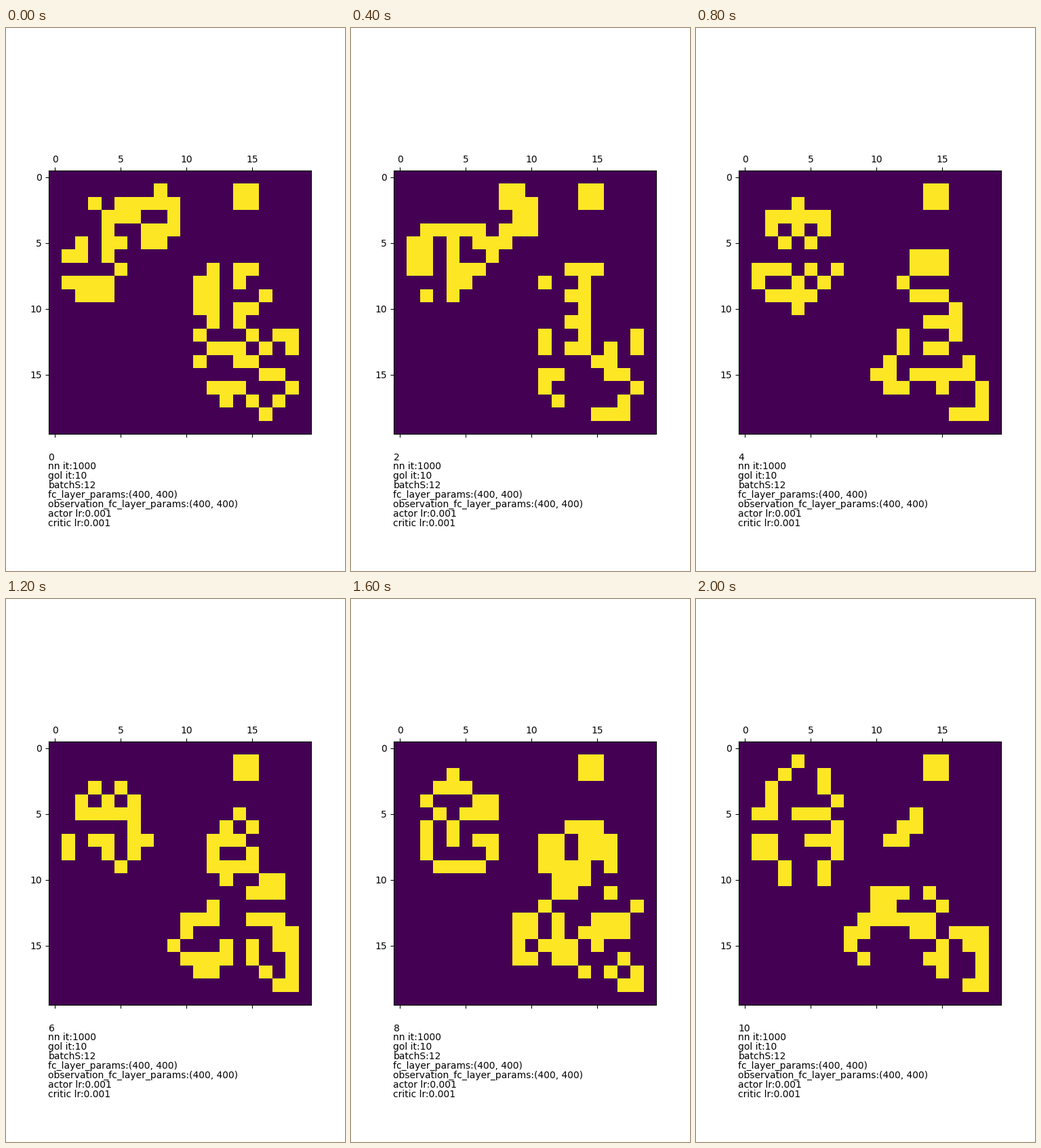
Recreate the animation shown at these times as a matplotlib script. Size 500 px wide and 800 px high, loop 8 s.

```python
from itertools import pairwise

import numpy as np
import matplotlib.pyplot as plt
from matplotlib.animation import FuncAnimation

SIZE = 20
GENERATIONS = 10
STEP_MS, LOOP_MS = 200, 8000
LINE_HEIGHT = 14

# The starting colony as strokes through (row, column) corner points.
STROKES = [
    [(6, 1), (6, 2), (5, 2)],
    [(2, 3), (3, 4), (6, 4), (7, 5), (8, 4), (8, 1), (9, 2), (9, 4)],
    [(5, 5), (4, 4), (3, 5), (3, 6), (2, 5), (2, 8), (1, 8), (2, 9),
     (4, 9), (4, 7), (5, 7), (5, 8)],
    [(1, 14), (2, 14), (2, 15), (1, 15)],
    [(7, 15), (7, 14), (8, 14)],
    [(9, 16), (10, 15), (10, 14), (11, 14)],
    [(8, 11), (10, 11)],
    [(7, 12), (11, 12), (12, 11), (13, 12), (13, 14), (12, 15), (13, 16),
     (12, 17), (12, 18), (13, 18)],
    [(13, 12), (14, 11)],
    [(14, 14), (14, 15), (15, 16), (15, 17), (16, 18), (18, 16), (16, 14),
     (16, 12), (17, 13)],
]

SETTINGS = [
    "nn it:1000",
    "gol it:10",
    "batchS:12",
    "fc_layer_params:(400, 400)",
    "observation_fc_layer_params:(400, 400)",
    "actor lr:0.001",
    "critic lr:0.001",
]


def draw_stroke(grid, points):
    """Set every cell on the straight or diagonal runs between points."""
    for (r0, c0), (r1, c1) in pairwise(points):
        count = max(abs(r1 - r0), abs(c1 - c0)) + 1
        rows = np.linspace(r0, r1, count).round().astype(int)
        cols = np.linspace(c0, c1, count).round().astype(int)
        grid[rows, cols] = 1


def life_step(grid):
    """One Game of Life generation; the outermost ring stays dead."""
    n = SIZE - 2
    around = sum(grid[1 + dy:1 + dy + n, 1 + dx:1 + dx + n]
                 for dy in (-1, 0, 1) for dx in (-1, 0, 1) if dy or dx)
    inner = grid[1:-1, 1:-1]
    result = np.zeros_like(grid)
    result[1:-1, 1:-1] = (around == 3) | ((inner == 1) & (around == 2))
    return result


start = np.zeros((SIZE, SIZE), dtype=int)
for stroke in STROKES:
    draw_stroke(start, stroke)

history = [start]
for _ in range(GENERATIONS):
    history.append(life_step(history[-1]))

plt.rcParams["font.family"] = "DejaVu Sans"
fig, ax = plt.subplots(figsize=(5, 8), dpi=100)
board = ax.matshow(start, cmap="viridis", vmin=0, vmax=1)


def caption(baseline, text):
    """Text aligned with the board, its baseline in pixels from the bottom."""
    return fig.text(0.125, baseline / 800, text, fontsize=10)


counter = caption(163, "0")
for line, text in enumerate(SETTINGS):
    caption(150 - LINE_HEIGHT * line, text)


def update(frame):
    generation = min(frame, GENERATIONS)
    board.set_data(history[generation])
    counter.set_text(str(generation))
    return board, counter


anim = FuncAnimation(fig, update, frames=LOOP_MS // STEP_MS,
                     interval=STEP_MS, repeat=True, repeat_delay=0)
plt.show()
```
